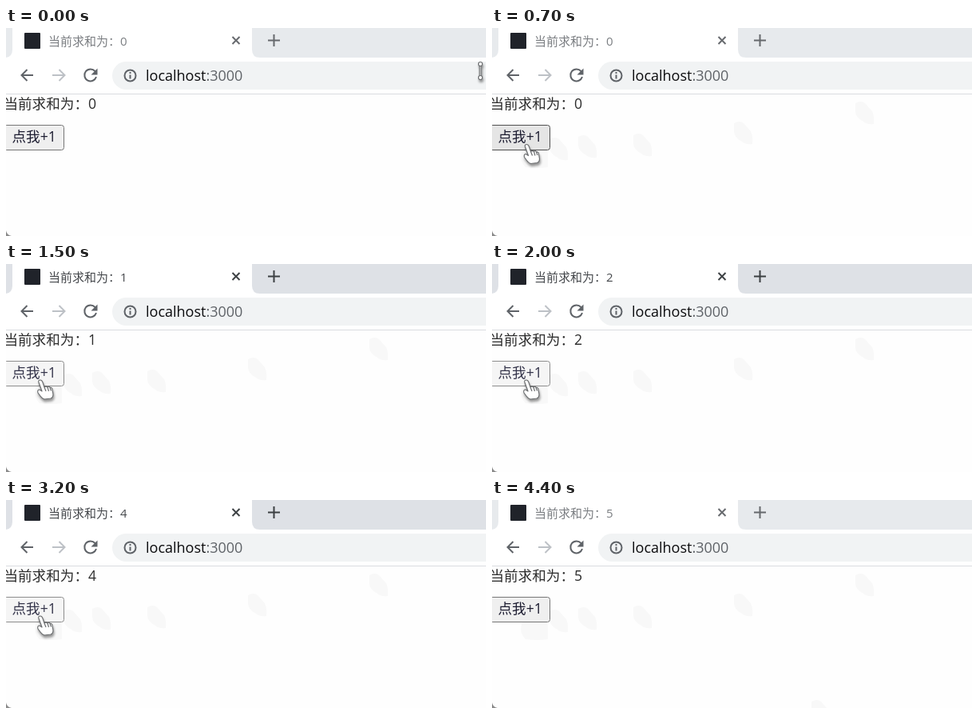
An HTML page that plays this animation: 601 px wide and 260 px high, repeating every 4500 ms.

```html
<!DOCTYPE html>
<html lang="zh-CN">
<head>
<meta charset="utf-8">
<title>Counter in a browser tab</title>
<style>
  :root {
    --bar: #e7eaed; --title-ink: #7b7e82; --icon-ink: #66696d;
    --face: #efefef; --edge: #767676; --label: #1c1c30;
    --sum: 0; --title: 0; --trail: 0;
    --beam: 1; --arrow: 0; --hand: 0;
    --tip: 458px, 92px; --nudge: 1px;
    animation: play 4500ms step-end infinite;
  }
  html, body { margin: 0; width: 100%; height: 100%; overflow: hidden; background: #fefefe; }
  svg { position: absolute; left: 0; top: 0; width: 601px; height: 260px; display: block; }
  text, .sum { font-family: "Open Sans", "Noto Sans CJK SC", "Noto Sans CJK", sans-serif; }

  .sum { position: absolute; white-space: nowrap; }
  .sum::after { content: counter(n); }
  .in-tab { left: 53px; top: 6px; font-size: 15px; line-height: 20px; color: var(--title-ink); }
  .in-tab::after { counter-reset: n var(--title); }
  .in-page { left: -2.6px; top: 82px; font-size: 17.6px; line-height: 24px; color: #2c2c2c; }
  .in-page::after { counter-reset: n var(--sum); }

  .bar { fill: var(--bar); }
  .icon { fill: none; stroke: #5f6368; stroke-width: 2; }
  .tab-icon { fill: none; stroke: var(--icon-ink); stroke-width: 2; }
  .button { fill: var(--face); stroke: var(--edge); }
  .label { fill: var(--label); }
  .trail use, .trail path { fill: #f8f8f8; opacity: calc(var(--trail) - var(--i)); }

  .cursor { fill: #fff; stroke: #6c6e70; stroke-width: 1.2; stroke-linejoin: round;
            filter: drop-shadow(1px 3px 1.5px #0006); }
  .beam { opacity: var(--beam); }
  .arrow { opacity: var(--arrow); transform: translate(var(--tip)); }
  .hand { opacity: var(--hand); transform: translate(calc(44px + var(--nudge)), calc(145px + var(--nudge))); }

  @keyframes play {
    2.222%  { --beam: 0; --arrow: 1; --trail: 1; }
    4.444%  { --tip: 306px, 117px; --trail: 2; }
    6.666%  { --tip: 180px, 132px; --trail: 3; }
    8.888%  { --tip: 111px, 134px; --trail: 4; }
    11.111% { --tip: 75px, 137px; --trail: 5; }
    13.333% { --arrow: 0; --hand: 1; --trail: 6; --face: #e5e5e5; --edge: #4f4f4f; }
    15.555% { --nudge: .5px; }
    17.777% { --nudge: 0px; }
    22.222% { --bar: #dee1e6; --title-ink: #45484c; --icon-ink: #3c4043; }
    22.222%, 33.333%, 44.444%, 57.777%, 71.111% { --face: #f5f5f5; --edge: #8d8d8d; --label: #34344a; }
    24.444%, 35.555%, 46.666%, 60%, 75.555% { --face: #e5e5e5; --edge: #4f4f4f; --label: #1c1c30; }
    24.444% { --sum: 1; }
    28.888% { --title: 1; }
    35.555% { --sum: 2; }
    40%     { --title: 2; }
    46.666% { --sum: 3; }
    51.111% { --title: 3; }
    60%     { --sum: 4; }
    64.444% { --title: 4; }
    75.555% { --sum: 5; }
    77.777% { --title: 5; }
    82.222% { --hand: 0; --arrow: 1; --tip: 403px, 250px; --trail: 7; --face: #efefef; --edge: #767676; }
    84.444% { --arrow: 0; }
    97.777% { --bar: #e7eaed; --title-ink: #7b7e82; --icon-ink: #66696d; }
  }
</style>
</head>
<body>
<svg viewBox="0 0 601 260">
  <defs>
    <path id="leaf" d="M-3 2Q4-2 9 2L18 12Q21 19 20 28Q12 29 7 25Q-3 20-3 12Z"/>
  </defs>

  <rect class="bar" width="601" height="37"/>
  <path fill="#fff" d="M-2 37Q8 37 8 27V0H308V27Q308 37 318 37H601V82H0V37Z"/>
  <rect y="82" width="601" height="1" fill="#dadce0"/>
  <rect x="23" y="6" width="20" height="20" rx="1" fill="#20232a"/>
  <path class="tab-icon" d="M283.5 11l9 9m0-9l-9 9M328 15.5h15M335.5 8v15"/>

  <rect x="133" y="42" width="500" height="35" rx="17.5" fill="#f1f3f4"/>
  <path class="icon" d="M34 59H19.5M26.5 52l-7 7 7 7"/>
  <path class="icon" style="stroke:#bdc1c6" d="M58 59h15.500M66.500 52l7 7-7 7"/>
  <path class="icon" d="M111.500 54A7.500 7.500 0 1 0 113 61"/>
  <path fill="#5f6368" d="M114.500 50.500v8h-8Z"/>
  <circle class="icon" cx="155.5" cy="59.5" r="7"/>
  <path class="icon" d="M155.500 58.500v5M155.500 55v2"/>
  <text x="175" y="66" font-size="18" fill="#0c0c0e">localhost<tspan fill="#5f6368">:3000</tspan></text>

  <g class="trail">
    <use href="#leaf" x="458" y="92" style="--i:0"/>
    <use href="#leaf" x="306" y="117" style="--i:1"/>
    <use href="#leaf" x="180" y="132" style="--i:2"/>
    <use href="#leaf" x="111" y="134" style="--i:3"/>
    <use href="#leaf" x="75" y="137" style="--i:4"/>
    <path d="M38 150H68L70 157V174Q56 176 42 174Q34 166 37 156Z" style="--i:5"/>
    <use href="#leaf" x="403" y="250" style="--i:6"/>
  </g>

  <rect class="button" x="-2.5" y="121.5" width="75" height="31" rx="3"/>
  <text class="label" x="7.5" y="142" font-size="17.6">点我+1</text>
  <path fill="#8b8b8b" d="M0 253Q1 259 7 260H0Z"/>
</svg>

<div class="sum in-tab">当前求和为：</div>
<div class="sum in-page">当前求和为：</div>

<svg viewBox="0 0 601 260">
  <g class="cursor beam">
    <path d="M593 47h2v13h-2Z"/>
    <circle cx="594" cy="45" r="2.5"/>
    <circle cx="594" cy="62" r="2.5"/>
  </g>
  <path class="cursor arrow" d="M0 2Q0 0 2 1L13 8Q16 11 13 14L16 18Q15 21 12 20L9 17Q7 18 4 17Q2 17 2 14Z"/>
  <path class="cursor hand" d="M-3 3Q-4 0-1 0Q1 0 2 3L4 9Q6 7 8 9Q10 7 11 9.500Q14 9 14 12L15 18Q15 22 12 23L4 24Q1 23-1 20L-4 16Q-5 12-2 12L1 14ZM4 9l2 5M8 9l1.500 5M11 9.500l1.500 4"/>
</svg>
</body>
</html>
```
